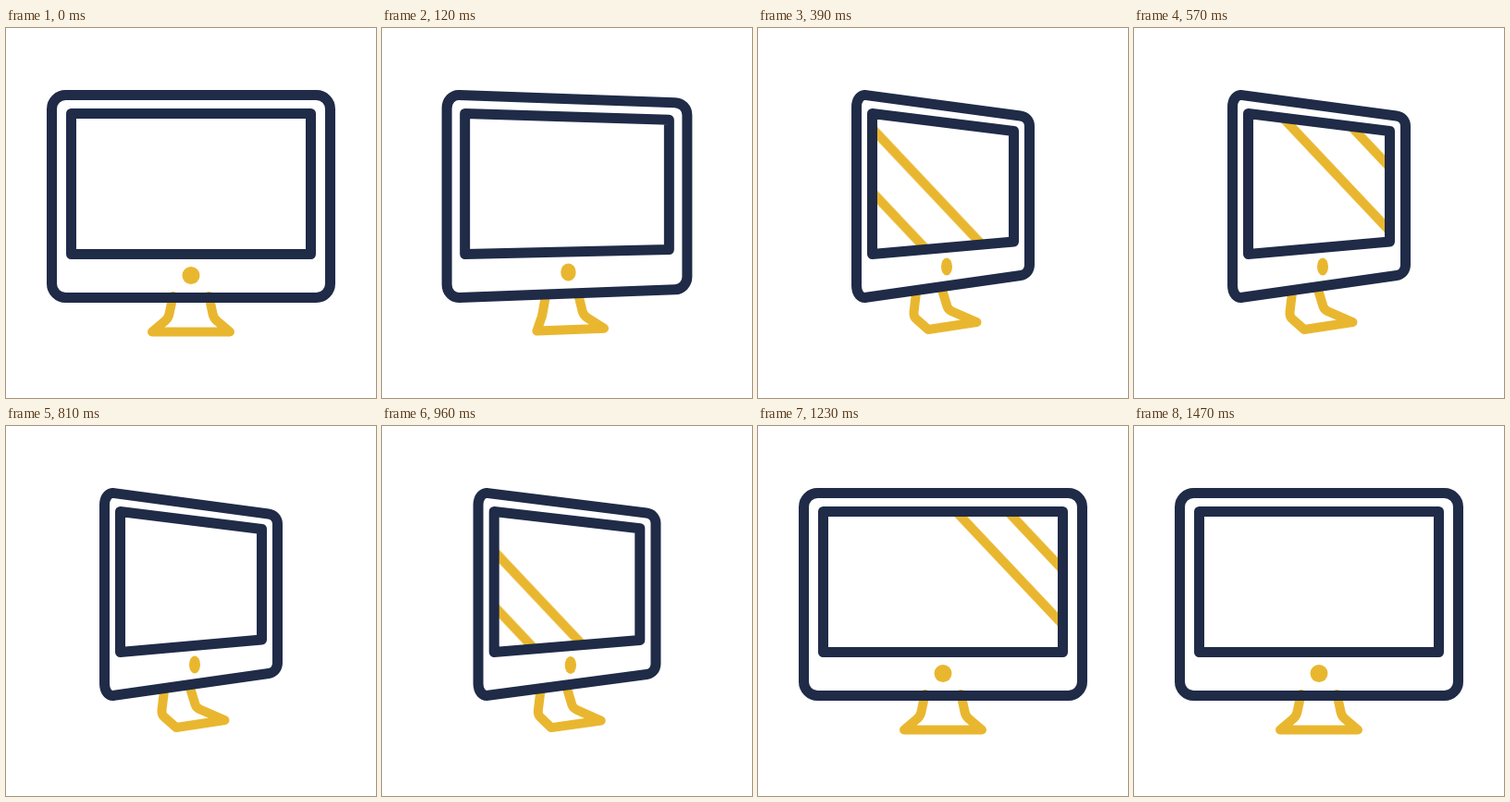
Animation, 400 px wide and 400 px high, one loop 3.62 s. Source, as an HTML page:

```html
<!DOCTYPE html>
<html lang="en">
<head>
<meta charset="utf-8">
<title>Monitor</title>
<style>
  html, body { margin: 0; width: 100%; height: 100%; overflow: hidden; background: #fff; }
  svg { display: block; width: 100%; height: 100%; }

  .line { fill: none; stroke-width: 11; stroke-linecap: round; stroke-linejoin: round; }
  .navy { stroke: #1f2b47; }
  .gold { stroke: #e9b72f; stroke-width: 10; }
  .dot { fill: #e9b72f; }

  /* The monitor turns aside, holds, and turns back. */
  .body, .screen, .stand, .dot {
    animation: 3620ms cubic-bezier(.5, 0, .5, 1) infinite;
  }
  .body { animation-name: body; }
  .screen { animation-name: screen; }
  .stand { animation-name: stand; }
  .dot { animation-name: dot; }

  @keyframes body {
    0%, 33.04%, 100% {
      d: path("M49.5 87.5 C49.5 79.2 56.2 72.5 64.5 72.5 L335.5 72.5 C343.8 72.5 350.5 79.2 350.5 87.5 L350.5 276.5 C350.5 284.8 343.8 291.5 335.5 291.5 L64.5 291.5 C56.2 291.5 49.5 284.8 49.5 276.5 Z");
    }
    7.79%, 25.25% {
      d: path("M106.5 85.5 C106.5 77 111 71.7 117 72.6 L283.5 95 C289.5 95.8 293.5 100 293.5 106 L293.5 256 C293.5 262 289.5 266.7 284 267.5 L117 291.3 C111 292.2 106.5 287 106.5 278.5 Z");
    }
  }
  @keyframes screen {
    0%, 33.04%, 100% { d: path("M70.5 92.5 L329.5 92.5 L329.5 244.5 L70.5 244.5 Z"); }
    7.79%, 25.25% { d: path("M123.5 92.5 L276.5 111.5 L276.5 231 L123.5 244.5 Z"); }
  }
  @keyframes stand {
    0%, 33.04%, 100% {
      d: path("M180.5 290 L176.5 309 Q175.5 314 171.5 317 L158 328.5 L242 328.5 L228.5 317 Q224.5 314 223.5 309 L219.5 290");
    }
    7.79%, 25.25% {
      d: path("M171 286 L168.5 307 Q168 312 171 314.5 L184 326 L236.5 318 L210 306.5 Q206 305 204.5 301 L199 283");
    }
  }
  @keyframes dot {
    0%, 33.04%, 100% { cx: 200px; cy: 267.5px; rx: 9.5px; }
    7.79%, 25.25% { cx: 204px; cy: 258px; rx: 6px; }
  }

  /* Two sweeps of a pair of reflections across the glass. */
  .sweep { animation: 3620ms step-end infinite; }
  .first { animation-name: first; }
  .second { animation-name: second; }

  @keyframes first {
    0% { transform: translateX(-700px); }
    4.75% { transform: translateX(-145px); animation-timing-function: cubic-bezier(.333, .32, .667, .856); }
    22.37% { transform: translateX(205px); }
    22.38%, 100% { transform: translateX(-700px); }
  }
  @keyframes second {
    0% { transform: translateX(-700px); }
    22.51% { transform: translateX(-130px); animation-timing-function: cubic-bezier(.333, .32, .667, .856); }
    40.6% { transform: translateX(268px); }
    40.61%, 100% { transform: translateX(-700px); }
  }
</style>
</head>
<body>
<svg viewBox="0 0 400 400">
  <defs>
    <clipPath id="glass"><path class="screen" d="M70.5 92.5 L329.5 92.5 L329.5 244.5 L70.5 244.5 Z"/></clipPath>
  </defs>
  <g clip-path="url(#glass)">
    <g class="sweep first">
      <path class="line gold" d="M32.5 0 l377.4 400 M-32.5 0 l377.4 400"/>
    </g>
    <g class="sweep second">
      <path class="line gold" d="M28 0 l377.4 400 M-28 0 l377.4 400"/>
    </g>
  </g>
  <path class="line gold stand" d="M180.5 290 L158 328.5 L242 328.5 L219.5 290"/>
  <ellipse class="dot" cx="200" cy="267.5" rx="9.5" ry="9.5"/>
  <path class="line navy screen" d="M70.5 92.5 L329.5 92.5 L329.5 244.5 L70.5 244.5 Z"/>
  <path class="line navy body" d="M49.5 72.5 L350.5 72.5 L350.5 291.5 L49.5 291.5 Z"/>
</svg>
</body>
</html>
```
